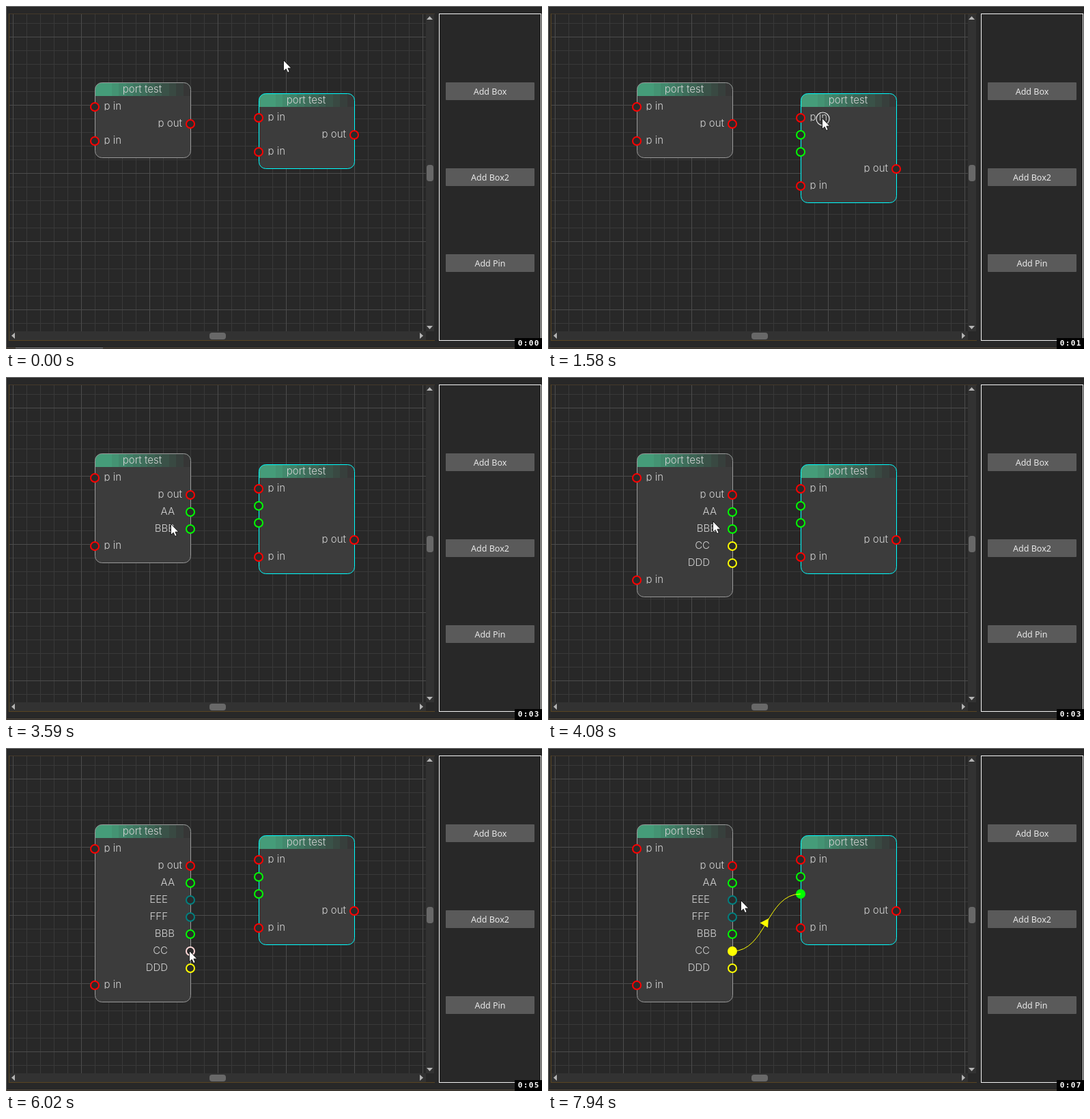
Animation, 785 px wide and 503 px high, one loop 8 s. Source, as an HTML page with a canvas:

```html
<!DOCTYPE html>
<html lang="en">
<head>
<meta charset="utf-8">
<title>Node editor</title>
<style>
html, body { margin: 0; width: 100%; height: 100%; overflow: hidden; background: #282828; }
canvas { display: block; }
</style>
</head>
<body>
<canvas id="stage" width="785" height="503"></canvas>
<script>
const ctx = document.getElementById('stage').getContext('2d');
const LOOP = 8000;
const RED = '#ff0000', GREEN = '#00ff00', YELLOW = '#ffff00', TEAL = '#008080', HOVER = '#ffd9d9';

// start, last step, step count, end x, end y
const START = [406, 79];
const MOVES = [
  [690, 1100, 6, 402, 155],
  [1430, 1430, 1, 401, 164],
  [2080, 2750, 9, 234, 167],
  [3220, 3590, 5, 241, 215],
  [3930, 4350, 6, 241, 199],
  [5030, 5770, 10, 272, 287],
  [5870, 5870, 1, 268, 293],
  [6020, 6020, 1, 268, 297],
  [6400, 6860, 6, 361, 217],
  [6960, 6960, 1, 365, 217],
  [7310, 7940, 8, 282, 223]
];
const PRESSES = [[1500, 1740], [2830, 3080], [3770, 3930], [4540, 4700], [6260, 7220]];
const TICKS = [1100, 2080, 3080, 4100, 5110, 6100, 7220];
const DRAG = 6400, DROP = 7220;

function rect(x, y, w, h, color) {
  ctx.fillStyle = color;
  ctx.fillRect(x, y, w, h);
}

function poly(points, color) {
  ctx.beginPath();
  points.forEach(([x, y]) => ctx.lineTo(x, y));
  ctx.closePath();
  ctx.fillStyle = color;
  ctx.fill();
}

function roundBox(x, y, w, h, r) {
  ctx.beginPath();
  ctx.roundRect(x, y, w, h, r);
}

function label(str, x, y, align, font, color) {
  ctx.font = font;
  ctx.textAlign = align;
  ctx.fillStyle = color;
  ctx.fillText(str, x, y);
}

const NODE_FONT = '300 15px Inter, sans-serif';
const NODE_TEXT = '#d2d2d2';

function cursorAt(t) {
  let [x, y] = START;
  for (const [t0, t1, n, ex, ey] of MOVES) {
    if (t < t0) break;
    const step = n > 1 ? Math.floor((t - t0) / ((t1 - t0) / (n - 1)) + 1e-6) + 1 : 1;
    const k = Math.min(1, step / n);
    const e = k * k * (3 - 2 * k);
    x += (ex - x) * e;
    y += (ey - y) * e;
  }
  return [Math.round(x), Math.round(y)];
}

function grid() {
  ctx.save();
  ctx.beginPath();
  ctx.rect(5, 12, 610, 465);
  ctx.clip();
  for (const major of [false, true]) {
    const gap = major ? 100 : 20;
    const color = major ? '#4c4c4c' : '#393939';
    for (let x = 10; x < 615; x += gap) rect(x, 12, 1, 465, color);
    for (let y = major ? 45 : 25; y < 477; y += gap) rect(5, y, 610, 1, color);
  }
  ctx.restore();
}

function scrollbars() {
  const track = '#323232', thumb = '#686868', arrow = '#b4b4b4';
  rect(615, 12, 12, 465, track);
  rect(5, 477, 610, 13, track);
  ctx.fillStyle = thumb;
  roundBox(616, 233, 10, 24, 4);
  ctx.fill();
  roundBox(298, 479, 24, 10, 4);
  ctx.fill();
  poly([[616, 20], [620.5, 15], [625, 20]], arrow);
  poly([[616, 469], [620.5, 474], [625, 469]], arrow);
  poly([[13, 479], [8, 483.5], [13, 488]], arrow);
  poly([[606, 479], [611, 483.5], [606, 488]], arrow);
}

function panel() {
  ctx.strokeStyle = '#f4f4f4';
  ctx.lineWidth = 1;
  ctx.strokeRect(634.5, 11.5, 149, 479);
  ['Add Box', 'Add Box2', 'Add Pin'].forEach((name, i) => {
    const y = 112 + 126 * i;
    ctx.fillStyle = '#5a5a5a';
    roundBox(644, y, 130, 26, 1);
    ctx.fill();
    label(name, 709, y + 18, 'center', '12.5px "Noto Sans", "Open Sans", sans-serif', '#e8e8e8');
  });
}

function frame(t) {
  rect(0, 0, 785, 503, '#282828');
  rect(0, 0, 785, 1, '#777777');
  rect(0, 0, 1, 503, '#666666');
  rect(4, 11, 624, 1, '#44392a');
  rect(4, 11, 1, 480, '#594522');
  rect(4, 490, 624, 1, '#594522');
  rect(0, 501, 745, 1, '#5b5040');
  if (t < 1500) rect(14, 501, 128, 1, '#909090');
}

function pin(x, y, color, filled) {
  ctx.beginPath();
  ctx.arc(x, y, 6, 0, 7);
  ctx.fillStyle = filled ? color : '#2b2b2b';
  ctx.fill();
  ctx.strokeStyle = color;
  ctx.lineWidth = 2;
  ctx.stroke();
}

// rows: { side, text, color, filled, end }
function node(x, y, rows, edge) {
  const h = 35 + 25 * rows.length;
  ctx.save();
  roundBox(x + 0.5, y + 0.5, 140, h, 10);
  ctx.fillStyle = '#3c3c3c';
  ctx.fill();
  ctx.clip();
  const bands = 12;
  for (let i = 0; i < bands; i++) {
    const k = i / (bands - 1);
    const mix = (a, b) => Math.round(a + (b - a) * k);
    const left = i ? 14 + i * 10.5 : 0;
    rect(Math.round(x + left), y, 140, 20, `rgb(${mix(69, 54)},${mix(156, 54)},${mix(121, 54)})`);
  }
  ctx.restore();
  roundBox(x + 0.5, y + 0.5, 140, h, 10);
  ctx.strokeStyle = edge;
  ctx.lineWidth = 1;
  ctx.stroke();
  label('port test', x + 69.5, y + 15, 'center', NODE_FONT, NODE_TEXT);

  rows.forEach((row, i) => {
    const py = y + 36 + 25 * i;
    const out = row.side === 'out';
    if (row.text) {
      ctx.save();
      ctx.beginPath();
      ctx.rect(x, py - 12, 140, 17);
      ctx.clip();
      label(row.text, out ? x + row.end : x + 13.5, py + 4, out ? 'right' : 'left', NODE_FONT, NODE_TEXT);
      ctx.restore();
    }
    pin(out ? x + 140 : x, py, row.color, row.filled);
  });
}

const input = (text, color, filled) => ({ side: 'in', text, color, filled });
const output = (text, color, end, filled) => ({ side: 'out', text, color, end, filled });

function leftRows(t) {
  const rows = [input('p in', RED), output('p out', RED, 128)];
  if (t >= 2910) rows.push(output('AA', GREEN, 117));
  if (t >= 4620) rows.push(output('EEE', TEAL, 107), output('FFF', TEAL, 107));
  if (t >= 2910) rows.push(output('BBB', GREEN, 117));
  if (t >= 3770) {
    const linked = t >= DROP;
    const color = t >= 5870 && !linked ? HOVER : YELLOW;
    rows.push(output('CC', color, 107, linked), output('DDD', YELLOW, 107));
  }
  rows.push(input('p in', RED));
  return rows;
}

function rightRows(t) {
  const rows = [input('p in', RED)];
  if (t >= 1580) rows.push(input('', GREEN), input('', GREEN, t >= DROP));
  rows.push(output('p out', RED, 128), input('p in', RED));
  return rows;
}

function wire(x1, y1, x2, y2) {
  const mx = (x1 + x2) / 2, my = (y1 + y2) / 2;
  ctx.beginPath();
  ctx.moveTo(x1, y1);
  ctx.bezierCurveTo(mx, y1, mx, y2, x2, y2);
  ctx.strokeStyle = YELLOW;
  ctx.lineWidth = 1;
  ctx.stroke();
  poly([[mx - 9.5, my + 0.5], [mx + 3, my - 6], [mx + 2, my + 7.5]], YELLOW);
}

function pointer(x, y, pressed) {
  if (pressed) {
    ctx.beginPath();
    ctx.arc(x + 1.5, y + 1.5, 9.5, 0, 7);
    ctx.strokeStyle = '#e6e6e6';
    ctx.lineWidth = 1.2;
    ctx.stroke();
  }
  const shape = [[0.5, 0.5], [0.5, 16.5], [4.2, 13.2], [6.6, 18.5], [9.2, 17.5], [6.9, 12.2], [11.8, 12.2]];
  poly(shape.map(([dx, dy]) => [x + dx, y + dy]), '#ffffff');
  ctx.strokeStyle = '#000000';
  ctx.lineWidth = 0.8;
  ctx.stroke();
}

function clock(t) {
  rect(745, 487, 40, 16, '#000000');
  const seconds = TICKS.filter(tick => t >= tick).length;
  [...`0:0${seconds}`].forEach((ch, i) => {
    label(ch, 753 + 8 * i, 498, 'center', 'bold 11px "DejaVu Sans Mono", monospace', '#ffffff');
  });
}

function draw(t) {
  const [x, y] = cursorAt(t);
  frame(t);
  grid();
  scrollbars();
  panel();
  node(130, 112, leftRows(t), '#9a9a9a');
  node(370, 128, rightRows(t), '#00ffff');
  if (t >= DROP) wire(270, 298, 370, 214);
  else if (t >= DRAG) wire(270, 298, x + 1, y + 1);
  pointer(x, y, PRESSES.some(([a, b]) => t >= a && t < b));
  clock(t);
}

const began = performance.now();
function tick() {
  draw((performance.now() - began) % LOOP);
  requestAnimationFrame(tick);
}
tick();
</script>
</body>
</html>
```
